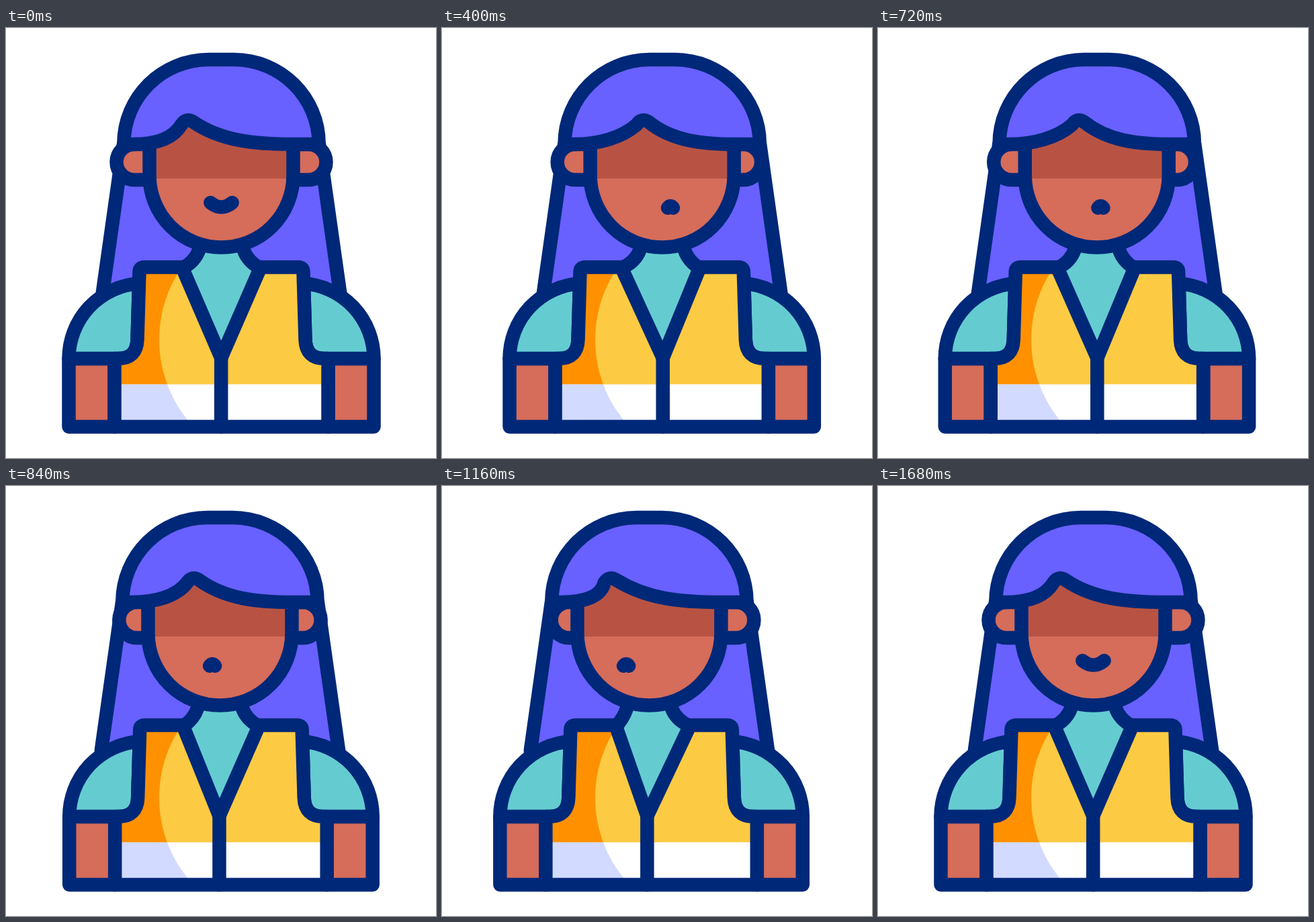
These frames come from a looping animation (640 px wide and 640 px high, 2480 ms). An HTML page with a canvas:

```html
<!DOCTYPE html>
<html lang="en">
<head>
<meta charset="utf-8">
<title>Woman in a safety vest</title>
<style>
  html, body { margin: 0; width: 100%; height: 100%; overflow: hidden; background: #fff; }
  canvas { display: block; }
</style>
</head>
<body>
<canvas width="640" height="640"></canvas>
<script>
const ctx = document.querySelector('canvas').getContext('2d');
const LOOP = 2480, STEP = 40, AXIS = 641;
const NAVY = '#002878', HAIR = '#6860ff', SKIN = '#d66c5a', SHADOW = '#b85344',
      TEAL = '#64ccd1', YELLOW = '#fdcb43', ORANGE = '#ff9100', LILAC = '#d2daff';

function ease(t, from, to) {
  const p = Math.min(1, Math.max(0, (t - from) / (to - from)));
  return p * p * (3 - 2 * p);
}

function shape(d, fill, stroke) {
  const path = new Path2D(d);
  if (fill) { ctx.fillStyle = fill; ctx.fill(path); }
  if (stroke) ctx.stroke(path);
}

function rect(color, x, y, w, h) {
  ctx.fillStyle = color;
  ctx.fillRect(x, y, w, h);
}

// Runs draw once per side; the right side is mirrored, so its shifts flip sign.
function bothSides(left, right, draw) {
  draw(left);
  ctx.save();
  ctx.transform(-1, 0, 0, 1, AXIS, 0);
  draw(right.map(v => -v));
  ctx.restore();
}

function drawVest(mid, [armL, strapL], [armR, strapR]) {
  const outline = `M${198.5 + armL} 363 Q${198.5 + armL} 356 ${206 + armL} 356 H${262 + strapL}
    L${320.2 + mid} 491 L${379 + strapR} 356 H${435 + armR} Q${442.5 + armR} 356 ${442.5 + armR} 363
    L${445.5 + armR} 464 Q${446.5 + armR} 492 ${474 + armR} 492 H${479.5 + armR} V593.5
    H${161.5 + armL} V492 H${167 + armL} Q${194.5 + armL} 492 ${195.5 + armL} 464 Z`;
  ctx.save();
  ctx.clip(new Path2D(outline));
  rect(ORANGE, 80, 340, 240, 190.5);
  rect(LILAC, 80, 530.5, 240, 70);
  // The lit area has a fixed round edge.
  ctx.beginPath();
  ctx.arc(418, 464, 190, 0, 7);
  ctx.rect(418, 330, 200, 300);
  ctx.clip();
  rect(YELLOW, 200, 340, 380, 190.5);
  rect('#fff', 200, 530.5, 380, 70);
  ctx.restore();
  shape(outline, null, true);
  shape(`M${320.2 + mid} 491 V593.5`, null, true);
}

function drawFringe(head, peak) {
  shape(`M${175.3 + head} 173 C${175.3 + head} 103 ${232 + head} 47 ${302 + head} 47
    H${339 + head} C${409 + head} 47 ${465.7 + head} 103 ${465.7 + head} 173 H${428 + head}
    C${370 + (head + peak) / 2} 173 ${320 + peak * .78} 168 ${279 + peak} 140
    Q${268 + peak} 133 ${261 + peak} 144
    C${249 + peak * .6} 164 ${225 + head} 173 ${190 + head} 173 Z`, HAIR, true);
}

function drawMouth(shift, open) {
  const x = 320.5 + shift, half = 16.2 - 12.2 * open, y = 260 + 7.8 * open;
  shape(`M${x - half} ${y} Q${x} ${273 - 11 * open} ${x + half} ${y}`, null, true);
}

function draw(t) {
  // Weights of the two poses: looking right, then looking left.
  const turn = ease(t, 550, 1105);
  const lookRight = ease(t, 150, 550) - turn;
  const lookLeft = turn - ease(t, 1105, 1440);
  const open = ease(t, 0, 200) - ease(t, 1440, 1680);
  const shift = (right, left) => right * lookRight + left * lookLeft;

  const head = shift(10.5, -13), mid = shift(12.5, -16);
  const left = [shift(10.3, -7.7), shift(7, -4)];
  const right = [shift(9.3, -11.5), shift(7.3, -10.5)];

  rect('#fff', 0, 0, 640, 640);
  ctx.strokeStyle = NAVY;
  ctx.lineWidth = 20.5;
  ctx.lineCap = ctx.lineJoin = 'round';

  shape(`M${175 + head} 173 L${143.5 + head} 394 H${497.5 + head} L${466 + head} 173 Z`, HAIR);
  bothSides([head], [head], ([h]) => shape(`M${175 + h} 173 L${143.8 + h} 394`, null, true));

  shape(`M${288 + head} 320 V330 Q${282 + head} 348 ${264 + left[1]} 356 L${320 + mid} 491
    L${377 + right[1]} 356 Q${359 + head} 348 ${353 + head} 330 V320 Z`, TEAL);
  bothSides([head, ...left], [head, ...right], ([h, arm, strap]) => {
    shape(`M${287.5 + h} 330 Q${281 + h} 348 ${263 + strap} 357`, null, true);
    shape(`M${93.5 + arm} 492 V593.5 H${161.5 + arm} V492 Z`, SKIN, true);
    shape(`M${93.5 + arm} 492 A112 112 0 0 1 ${198 + arm} 380.3 L${195.5 + arm} 464
      Q${194.5 + arm} 492 ${167 + arm} 492 Z`, TEAL, true);
  });
  drawVest(mid, left, right);

  bothSides([head, shift(10.5, -2)], [head, shift(-2, -13)], ([h, ear]) =>
    shape(`M${213.5 + h} 173 H${191 + ear} a26.5 26.5 0 0 0 0 53 H${213.5 + h}`, SKIN, true));

  const jaw = `V219.5 A107 107 0 0 0 ${427.5 + head} 219.5 V`;
  shape(`M${213.5 + head} 130 ${jaw}130 Z`, SKIN);
  rect(SHADOW, 213.5 + head, 130, 214, 94);
  shape(`M${213.5 + head} 173 ${jaw}173`, null, true);
  drawFringe(head, shift(42, -21));
  drawMouth(shift(28.5, -50), open);
}

const start = performance.now();
function frame() {
  const t = (performance.now() - start) % LOOP;
  draw(Math.floor(t / STEP) * STEP);
  requestAnimationFrame(frame);
}
frame();
</script>
</body>
</html>
```
